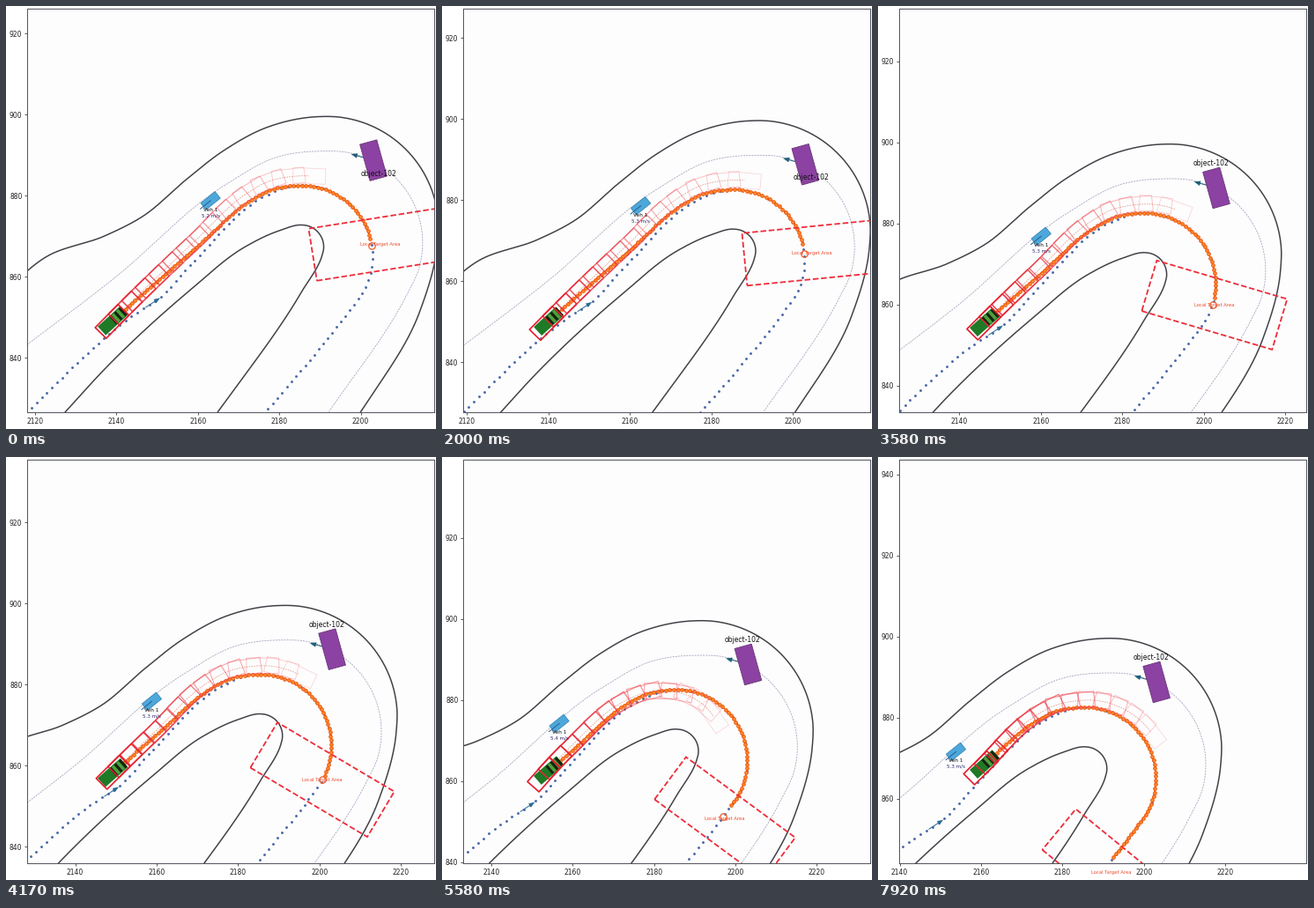
A matplotlib script for the animation above (8000 ms loop, 488 by 480 pixels).

```python
import numpy as np
import matplotlib.pyplot as plt
from matplotlib.animation import FuncAnimation
from matplotlib.collections import PolyCollection
from matplotlib.ticker import FuncFormatter, MultipleLocator

W, H, DPI = 488, 480, 64
PX = 72 / DPI                      # points per pixel
FRAMES, LOOP = 96, 8000
X0, Y0 = 2100, 800                 # map origin; all points are relative to it
SPAN_X, SPAN_Y = 100, 458 / 4.6
REPLAN = 8.2                       # simulation steps between two plans
FOOTPRINTS = 14


# ---------- geometry ----------
def bend(cx, cy, r, start, stop, n=9):
    a = np.radians(np.linspace(start, stop, n))
    return list(zip(cx + r * np.cos(a), cy + r * np.sin(a)))


class Path:
    """Hermite curve through points, addressed by arc length."""

    def __init__(self, points):
        p = np.array(points, float)
        t = np.concatenate([[0], np.cumsum(np.hypot(*np.diff(p, axis=0).T))])
        m = np.gradient(p, t, axis=0)
        x = np.arange(0, t[-1], .25)
        i = np.searchsorted(t, x, side='right') - 1
        h = (t[i + 1] - t[i])[:, None]
        u = (x - t[i])[:, None] / h
        self.p = ((1 + 2 * u) * (1 - u) ** 2 * p[i] + u * (1 - u) ** 2 * h * m[i]
                  + u * u * (3 - 2 * u) * p[i + 1] + u * u * (u - 1) * h * m[i + 1])
        step = np.hypot(*np.diff(self.p, axis=0).T)
        self.s = np.concatenate([[0], np.cumsum(step)])

    def at(self, s):
        return np.stack([np.interp(s, self.s, self.p[:, i]) for i in (0, 1)], -1)

    def angle(self, s):
        d = self.at(np.add(s, .6)) - self.at(np.subtract(s, .6))
        return np.arctan2(d[..., 1], d[..., 0])

    def shifted(self, s, d):
        a = self.angle(s)
        return self.at(s) + np.stack([-np.sin(a) * d, np.cos(a) * d], -1)

    def near(self, point):
        return self.s[np.hypot(*(self.p - point).T).argmin()]

    def s_at_x(self, x):
        top = self.p[:, 0].argmax()
        return np.interp(x, self.p[:top, 0], self.s[:top])


def box(center, angle, length, width, ahead=0):
    c, s = np.cos(angle), np.sin(angle)
    x = ahead + np.array([-1, 1, 1, -1]) * length / 2
    y = np.array([-1, -1, 1, 1]) * width / 2
    return np.stack([center[0] + x * c - y * s, center[1] + x * s + y * c], -1)


# straight approach, round hairpin, straight exit
OUTER = Path([(12, 56), (23, 65.1), (37.1, 70.1), (46.4, 74.9), (57, 83.9),
              (66.4, 91.2), (77, 96.9)] + bend(91.5, 72, 27.6, 95, -8)
             + [(114.4, 51.2), (98, 23.5)])
MIDDLE = Path([(12, 38.7), (39.6, 59.8), (66.9, 82.8), (79.9, 89.7)]
              + bend(92.5, 68.4, 22.7, 95, -33) + [(91, 25)])
INNER = Path([(25, 24), (38.4, 38.6), (58.4, 57), (71.4, 67.3), (80, 71.4)]
             + bend(85.5, 67.4, 5.4, 90, -20) + [(85.4, 56.2), (63, 24)])
HAIRPIN = bend(85.3, 65, 17.6, 98, -43) + [(88.5, 40.7), (74, 23.8)]
ROUTE = Path([(15, 23.8), (45.2, 51.3), (50, 54.4), (58.2, 63), (77.7, 80.6)] + HAIRPIN)
LANE = Path([(30, 40.8), (45.4, 54.9), (60, 67.7), (73.5, 79.2), (78, 81.5)] + HAIRPIN)
GOAL_START = LANE.near((102.45, 67.8))

# ---------- motion ----------
# the car pulls away, then slowly loses speed
N = np.arange(80) + .5
RATE = (.62 - .0052 * N) / (1 + np.exp((18.5 - N) / 3))
TRAVEL = np.concatenate([[0], np.cumsum(RATE)])


def sim_step(k):
    """Five new pictures in every six frames, after a short pause."""
    return 0 if k < 4 else k - 3 - (k - 3) // 6


# ---------- stage ----------
plt.rcParams['font.family'] = 'DejaVu Sans'
fig = plt.figure(figsize=(W / DPI, H / DPI), dpi=DPI, facecolor='white')
ax = fig.add_axes([24 / W, 19 / H, 462 / W, 458 / H], facecolor='#fdfdfe')
for axis, base in ((ax.xaxis, X0), (ax.yaxis, Y0)):
    axis.set_major_locator(MultipleLocator(20))
    axis.set_major_formatter(FuncFormatter(lambda v, _, b=base: f'{round(v + b)}'))
ax.tick_params(length=3 * PX, width=.8 * PX, pad=2.5 * PX, labelsize=7.6 * PX,
               color='#333338', labelcolor='#222222')
for spine in ax.spines.values():
    spine.set(color='#55555f', linewidth=1 * PX)
    spine.set_zorder(12)


def line(points=((0, 0),), color='k', width=1, z=1, **kw):
    x, y = np.array(points).T
    return ax.plot(x, y, color=color, lw=width * PX, zorder=z, **kw)[0]


def patch(fill, edge='none', width=1, z=5, points=((0, 0), (1, 0), (1, 1)), **kw):
    return ax.fill(*np.array(points).T, facecolor=fill, edgecolor=edge,
                   lw=width * PX, zorder=z, **kw)[0]


def label(text, size, color='#111111'):
    return ax.text(0, 0, text, size=size * PX, color=color, ha='center',
                   va='center', zorder=13)


def arrow(tail, tip, color, head):
    tail, tip = np.array(tail), np.array(tip)
    d = (tip - tail) / np.hypot(*(tip - tail)) * head
    side = .38 * np.array([-d[1], d[0]])
    line([tail, tip - d / 2], color, 1, 4)
    patch(color, z=4, points=[tip, tip - d + side, tip - d - side])


line(OUTER.p, '#404046', 1.5)
line(INNER.p, '#404046', 1.5)
line(MIDDLE.p, '#a3a3bb', .8, ls=(0, (2.6, 1.3)))
line(ROUTE.at(np.arange(.5, ROUTE.s[-1], 1.75)), '#4a68a6', z=2, ls='none',
     marker='o', ms=2.9 * PX, mew=0)
arrow((47.2, 52.5), (50.7, 54.8), '#2c6a94', 1.5)

OBJECT = np.array([103.1, 88.75])
arrow(OBJECT, (97.6, 90.3), '#1f5f78', 1.6)
patch('#8b42a2', '#6c3a78', .9,
      points=box(OBJECT, np.radians(105.5), 9.3, 4.3))
object_text = label('object-102', 7.6)

veh = patch('#4ea7da', '#3585b4', .8)
veh_line = line(color='#245f92', z=6)
veh_text = label('Veh 1', 5.9)
speed_text = label('', 5.6, '#2c2c70')

track = line(color='#f5600f', width=1.6, z=6, marker='o', ms=3.7 * PX,
             mfc='#ff8d2b', mec='#ee560f', mew=.9 * PX)
plan_line = line(color='#d9705a', width=.8, z=6, ls=(0, (2, 1.5)), alpha=.7)

fade = np.linspace(1, 0, FOOTPRINTS)      # far to near
rgba = np.stack([.9 + .06 * fade, .12 + .3 * fade, .18 + .25 * fade,
                 1 - .75 * fade], -1)
prints = PolyCollection([], facecolors='none', edgecolors=rgba,
                        linewidths=(1.7 - .8 * fade) * PX, zorder=8)
ax.add_collection(prints, autolim=False)

body, hood = patch('#1e7a26', z=7), patch('#4fa03c', z=7)
bars = [patch('#14250f', z=7) for _ in range(3)]

area = patch('none', '#ee2c38', 1.8, 9, ls=(0, (3.6, 1.6)))
goal = line(color='#f0602c', z=10, marker='o', ms=7.4 * PX, mfc='none',
            mew=1.3 * PX)
area_text = label('Local Target Area', 5.2, '#f04a2a')


def draw_car(s):
    pos, heading = LANE.at(s), LANE.angle(s)
    body.set_xy(box(pos, heading, 7.4, 2.9))
    hood.set_xy(box(pos, heading, 3.2, 2.4, 1.5))
    for i, bar in enumerate(bars):
        bar.set_xy(box(pos, heading, .7, 2.5, .3 + 1.5 * i))


def draw_plan(s, travel, plan, age):
    inside = plan * 2 % 7 > 4             # now and then a plan cuts the bend
    swell, drift = (1.7, -3.2) if inside else (.8, 2.4)
    q = np.linspace(0, 1, 80)
    start, stop = s + .7 - .35 * age, s + 60 - .65 * travel
    mid = LANE.shifted(start + (stop - start) * q,
                       4 * swell * q * (1 - q) + drift * q * q)
    dx, dy = np.gradient(mid, axis=0).T
    turn = np.unwrap(np.arctan2(dy, dx))
    plan_line.set_data(*mid.T)
    x, y, a = (np.interp(fade, q, v) for v in (mid[:, 0], mid[:, 1], turn))
    prints.set_verts([box((u, v), w, 8, 3.8) for u, v, w in zip(x, y, a)])


def draw_goal(s, travel):
    g, tilt = LANE.at(s), LANE.angle(s) + np.pi / 2
    slide = 1 + 1.05 * np.cos(2 * np.pi * travel / 21.5)
    mid = g + slide * np.array([np.cos(tilt), np.sin(tilt)])
    goal.set_data([g[0]], [g[1]])
    area.set_xy(box(mid, tilt, 33.4, 13))
    area_text.set_position(mid)


def draw_vehicle(d):
    x, y = 63.1 - .425 * d, 78.8 - .25 * d - .0037 * d * d
    way = np.radians(39)
    veh.set_xy(box((x, y), way, 4.5, 2.1))
    veh_line.set_data([x, x - 3.2 * np.cos(way)], [y, y - 3.2 * np.sin(way)])
    veh_text.set_position((x, y - 2.25))
    speed_text.set_position((x, y - 3.7))
    speed_text.set_text(f'{5.245 + .015 * d - .00048 * d * d:.1f} m/s')


def update(k):
    n = sim_step(k)
    d = TRAVEL[n]
    plan, age = divmod(n + 2.7, REPLAN)

    left, low = 18.05 + d, 26.6 + d * (1.03 - .0105 * d)
    ax.set_xlim(left, left + SPAN_X)
    ax.set_ylim(low, low + SPAN_Y)

    s_car = LANE.s_at_x(39.1 + d)
    s_goal = GOAL_START + d + .014 * d * d
    draw_car(s_car)
    draw_plan(s_car, d, plan, age)
    draw_goal(s_goal, d)
    draw_vehicle(d)
    track.set_data(*LANE.at(np.arange(s_goal - .3 - .5 * age, s_car + 1.5, -1)).T)
    object_text.set_position(OBJECT + ((1.4, -3.3) if d < 2 else (-1.3, 6)))
    return []


anim = FuncAnimation(fig, update, frames=FRAMES, interval=LOOP / FRAMES,
                     init_func=lambda: update(0), repeat=True, repeat_delay=0,
                     blit=False)
plt.show()
```
